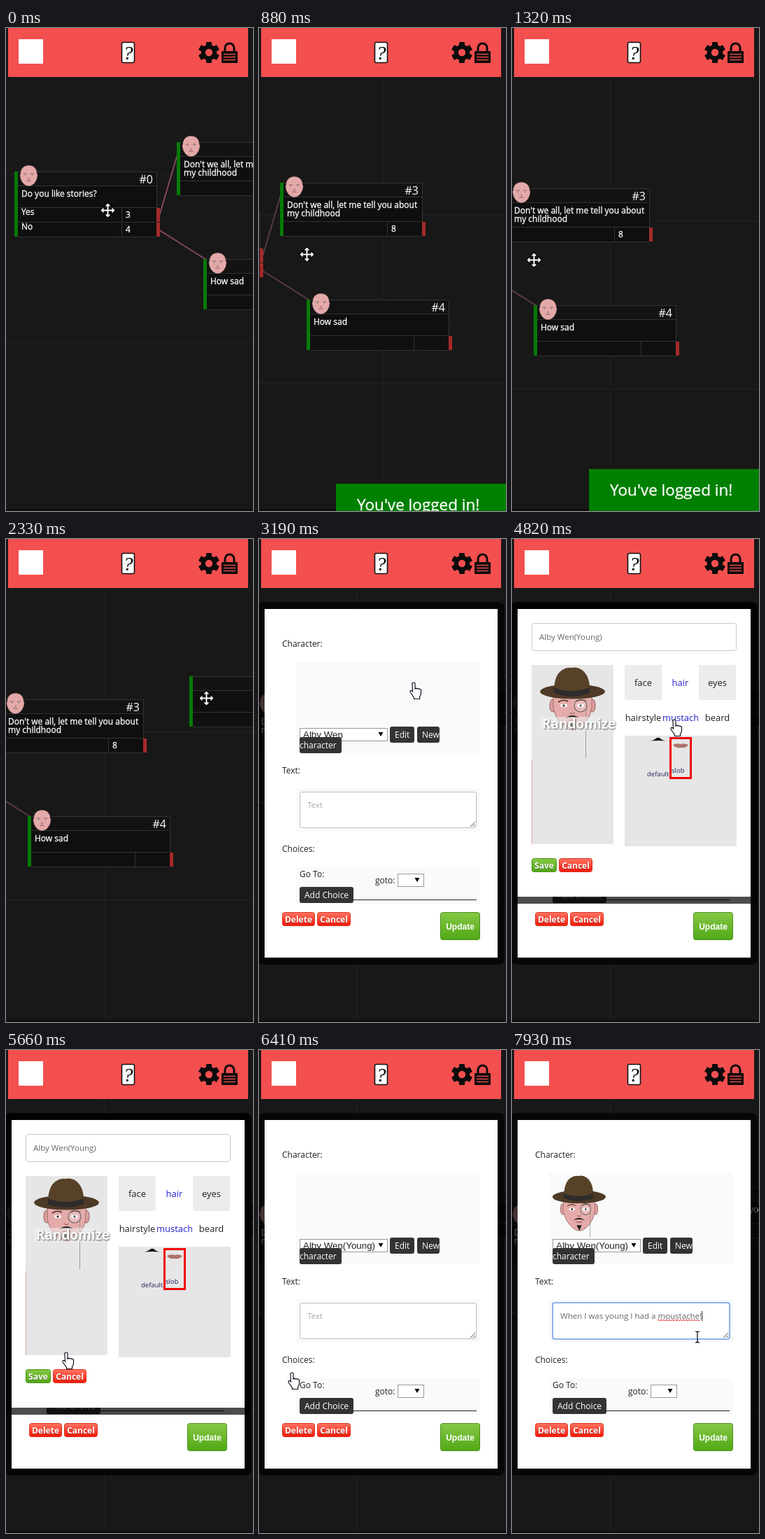
These frames come from a looping animation (353 px wide and 690 px high, 8000 ms). An HTML page:

```html
<!DOCTYPE html>
<html lang="en">
<head>
<meta charset="utf-8">
<title>Story node editor</title>
<style>
html, body { margin: 0; width: 100%; height: 100%; overflow: hidden; background: #181818; }
svg { display: block; width: 353px; height: 690px; }
text { font-family: "Open Sans", "Noto Sans", sans-serif; font-size: 12px; white-space: pre; }
.arial { font-family: "Liberation Sans", Arial, sans-serif; }
.node text { fill: #fff; stroke: #fff; stroke-width: .3px; }
.dialog text { fill: #222; }
.dialog .light { fill: #fff; }
.dialog .blue { fill: #2222cc; }
.dialog .field { fill: #666; font-size: 11.5px; }
.bold { font-weight: 700; }
.mid { text-anchor: middle; }
.end { text-anchor: end; }
</style>
</head>
<body>
<svg id="stage" viewBox="0 0 353 690" xmlns="http://www.w3.org/2000/svg"></svg>
<script>
const LOOP = 8000;
const NAME = 'Alby Wen';
const STORY = 'When I was young I had a moustache!';

// Bursts of picture changes: first time, last time, number of steps.
const BURSTS = [
  [120, 880, 8], [1000, 1780, 8], [2010, 2330, 4], [2530, 2990, 5], [3190, 3950, 8],
  [4170, 4470, 4], [4700, 5040, 4], [5240, 5760, 6], [6410, 6920, 6], [7140, 7380, 3], [7610, 7930, 4]
];
const STEPS = [0, ...BURSTS.flatMap(([a, b, n]) =>
  Array.from({ length: n }, (_, i) => Math.floor(a + (b - a) * i / (n - 1))))];

// Motion tables: time, then values.
const PAN = [[0, 0, 0], [337, 0, 0], [880, -214, 58], [1222, -251, 66]];
const POINTER = [
  [0, 146, 261], [337, 283, 266], [880, 69, 324], [1222, 32, 332], [1780, 266, 196], [2010, 266, 196],
  [2330, 287, 228], [2760, 287, 228], [3190, 221, 205], [3516, 204, 280], [3733, 204, 280],
  [3950, 150, 142], [4170, 150, 142], [4270, 240, 206], [4470, 240, 254], [4700, 238, 256],
  [4813, 232, 258], [5040, 241, 314], [5240, 241, 314], [5760, 47, 461], [6410, 47, 461],
  [6818, 250, 385], [6920, 265, 395], [7380, 265, 395], [7610, 265, 410]
];
const TOAST = [[771, 690], [880, 651], [1000, 630], [1445, 630], [1668, 690]];
const MAIN = [[2760, -518, 0], [2875, -300, .5], [2990, -90, 1], [3190, 0, 1]];
const EDITOR = [[3733, -411, 0], [3841, -190, .5], [3950, 0, 1]];
const TYPED = [[6920, 0], [7140, 3], [7380, 12], [7610, 17], [7930, 35]];

function at(table, t) {
  const i = table.findIndex(k => k[0] > t);
  if (i === 0) return table[0].slice(1);
  if (i < 0) return table[table.length - 1].slice(1);
  const a = table[i - 1], b = table[i], p = (t - a[0]) / (b[0] - a[0]);
  return a.slice(1).map((v, j) => v + (b[j + 1] - v) * p);
}

// Markup helpers
const rect = (x, y, w, h, fill, more = '') =>
  `<rect x="${x}" y="${y}" width="${w}" height="${h}" fill="${fill}" ${more}/>`;
const box = (x, y, w, h, fill, line, r = 0) =>
  rect(x + .5, y + .5, w - 1, h - 1, fill, `stroke="${line}" rx="${r}"`);
const text = (x, y, s, cls = '', more = '') => `<text x="${x}" y="${y}" class="${cls}" ${more}>${s}</text>`;
const path = (d, fill, more = '') => `<path d="${d}" fill="${fill}" ${more}/>`;
const oval = (x, y, rx, ry, fill, more = '') =>
  `<ellipse cx="${x}" cy="${y}" rx="${rx}" ry="${ry}" fill="${fill}" ${more}/>`;
const group = (id, inner, more = '') => `<g id="${id}" ${more}>${inner}</g>`;

const baldFace = (x, y, s) => `<g transform="translate(${x} ${y}) scale(${s})">` +
  path('M0-14.5C8-14.5 11.5-9 11.5-3L12.5-1 11.5 4C10 9 6 14.5 0 14.5S-10 9-11.5 4L-12.5-1-11.5-3C-11.5-9-8-14.5 0-14.5Z', '#e3a9a8', 'stroke="#c08a88" stroke-width=".5"') +
  path('M-7.5-2.5q2.500-1.200 5 0M7.5-2.5q-2.500-1.200-5 0M-3 7.500q3-1.500 6 0M-1.5 4h3', 'none', 'stroke="#7d4c48" stroke-width=".9"') +
  oval(-5, -.5, 1.8, .9, '#f6e8e4') + oval(5, -.5, 1.8, .9, '#f6e8e4') +
  oval(-5, -.5, .8, .8, '#333') + oval(5, -.5, .8, .8, '#333') + '</g>';

const hatFace =
  oval(58, 238, 4, 9, '#dd9f9e', 'stroke="#8d5a58"') + oval(115, 238, 4, 9, '#dd9f9e', 'stroke="#8d5a58"') +
  path('M59 218h55v22q-2 18-16 29-11 8-22 0-15-12-17-29Z', '#e5abaa', 'stroke="#a06c6a"') +
  path('M66 233q7-5 14-1M92 232q7-4 14 0', 'none', 'stroke="#4a3020" stroke-width="1.6"') +
  oval(74, 238, 5, 2.4, '#fff') + oval(98, 238, 5, 2.4, '#fff') +
  oval(74, 238, 1.6, 1.8, '#333') + oval(98, 238, 1.6, 1.8, '#333') +
  path('M83 248q3 3 7 0', 'none', 'stroke="#a06c6a" stroke-width="1.4"') +
  path('M76 256q10-8 21 0-10-3-21 0Z', '#222') +
  path('M81 259h11', 'none', 'stroke="#9b4c4c" stroke-width="1.5"') +
  path('M82 264h9l-4 9Z', '#222') +
  oval(98, 238, 9, 9, 'rgba(255,255,255,.2)', 'stroke="#666" stroke-width="1.2"') +
  path('M105.5 244v69', 'none', 'stroke="#8a8a8a" stroke-width=".8"') +
  oval(86.5, 218, 46.5, 10.5, '#4d3a26') +
  path('M60 218q0-24 12-31 6-4 13-3 8-2 15 3 12 9 11 31-25 10-51 0Z', '#574229') +
  path('M60 212q25 10 51 0v8q-26 10-51 0Z', '#2e2c2b');

// Story canvas
function node(id, x, y, lines, rows, face) {
  const body = lines > 1 ? 35 : 31, top = y + 20 + body, h = 20 + body + 21 * rows.length;
  let s = rect(x + 5, y, 199, h, '#0f0f0f') + rect(x + 5, y, 199, 20, '#131313') +
    rect(x, y, 5, h, '#067a06') +
    path(`M${x + 5} ${y + .5}h198.5v${h}h-198.5M${x + 5} ${y + 20.5}h198`, 'none', 'stroke="#333"') +
    text(x + 198, y + 17, '#' + id, 'end', 'style="font-size:16px;stroke:none"');
  rows.forEach(([label, to], i) => {
    const r = top + 21 * i;
    s += path(`M${x + 5} ${r + .5}h198M${x + 153.5} ${r}v21`, 'none', 'stroke="#333"') +
      rect(x + 203, r + 1, 5, 20, '#a52a2a') + text(x + 10, r + 11, label) + text(x + 159, r + 15, to);
  });
  return s + (face ? baldFace(x + 20.5, y + 6, 1) : '');
}

const world =
  path('M219.500 267L249 167M219.500 289L287 331.500', 'none', 'id="links" stroke-width="1.8"') +
  node(0, 12, 205, 1, [['Yes', 3], ['No', 4]], true) + text(22, 241, 'Do you like stories?') +
  node(3, 244, 163, 2, [['', 8]], true) + text(254, 199, "Don't we all, let me tell you about") + text(254, 211, 'my childhood') +
  node(4, 282, 330, 1, [['', '']], true) + text(292, 366, 'How sad') +
  group('fresh', node(8, 513, 130, 1, [['', '']], false) + text(523, 166, '', '', 'id="preview"'));

// Page header
const teeth = Array.from({ length: 6 }, (_, i) =>
  rect(286, 20, 8, 8, '#0b0b0b', `rx="1" transform="rotate(${i * 60} 290 35)"`)).join('');
const header = rect(3, 0, 343, 70, '#f44f4f') +
  rect(18, 16, 35, 35, '#fff') +
  rect(165.5, 20.5, 18, 29, '#fff', 'stroke="#111" stroke-width="1.6" rx="2"') +
  text(174.5, 45, '?', 'mid', 'style="font:italic 28px \'Liberation Serif\',serif"') +
  teeth + '<circle cx="290" cy="35" r="8.2" fill="none" stroke="#0b0b0b" stroke-width="6"/>' +
  path('M313 34v-5.500a6.500 6.500 0 0 1 13 0v5', 'none', 'stroke="#0b0b0b" stroke-width="3"') +
  rect(308, 33, 23, 17, '#0b0b0b', 'rx="1"') +
  path('M311 37.5h17M311 41.5h17M311 45.5h17', 'none', 'stroke="#e04a48" stroke-width="1.4"');

// Dialogs
const button = (x, y, w, label, hue) =>
  box(x, y, w, 20, `url(#${hue})`, hue === 'red' ? '#d8321f' : '#4b9317', 3) +
  text(x + w / 2, y + 14.5, label, 'light bold mid', 'style="text-shadow:0 1px 1px rgba(0,0,0,.4)"');
const arrow = (x, y) => path(`M${x - 3.5} ${y - 3}h7l-3.5 6Z`, '#000');
const darkButton = (x, y, w, label, tx) => rect(x, y, w, 23, '#333', 'rx="3"') + text(tx, y + 16, label, 'light');
const sheet = bottom => rect(-2, 90, 353, bottom - 80, 'rgba(0,0,0,.7)', 'rx="8"') + rect(8, 100, 333, bottom - 100, '#fff');
const panel = (y, h) => rect(53, y, 263, h, '#f9fafa');

const main = sheet(598) +
  text(33, 154, 'Character:') + panel(175, 131) +
  group('mainBald', baldFace(90, 220, 2.6)) +
  group('mainHat', hatFace, 'transform="translate(25 18) scale(.82 .88)" clip-path="url(#chain)"') +
  box(58, 270, 126, 19, '#fff', '#999') +
  text(63, 284, NAME, 'arial', 'id="picked" style="font-size:13.33px"') + arrow(174, 279) +
  darkButton(187, 268, 35, 'Edit', 194) + darkButton(226, 268, 32, 'New', 233) + darkButton(58, 283, 60, 'character', 58) +
  text(33, 335, 'Text:') + panel(356, 62) +
  box(58, 361, 253, 52, '#fff', '#bbb', 3) +
  rect(58, 361, 253, 52, 'none', 'id="focus" rx="3" stroke="#8fb2ee" stroke-width="2"') +
  path('M302 411l7-7M306 411l3-3', 'none', 'stroke="#555"') +
  text(69, 384, 'Text', 'field', 'id="hint" style="fill:#aaa"') +
  text(69, 384, '', 'field', 'id="typed"') + rect(0, 373, 1, 14, '#222', 'id="caret"') +
  path('M208 386' + 'q1 -2 2 0t2 0'.repeat(15), 'none', 'id="squiggle" stroke="#e33" stroke-width="1"') +
  text(33, 447, 'Choices:') + panel(469, 52) +
  text(58, 483, 'Go To:') + text(166, 492, 'goto:') + box(198, 478, 38, 19, '#fff', '#999') + arrow(226, 487) +
  rect(58, 515, 253, 1, '#222') + darkButton(58, 497, 77, 'Add Choice', 65) +
  button(33, 533, 47, 'Delete', 'red') + button(83, 533, 48, 'Cancel', 'red') +
  box(259, 533, 57, 40, 'url(#green)', '#4b8f1c', 3) + text(287.5, 558, 'Update', 'arial light bold mid');

const tab = (i, label) => rect(161 + 53 * i, 180, 53, 50, '#ececec') + text(187.5 + 53 * i, 210, label, 'mid', 'style="font-size:13px"');
const small = 'style="font-size:9.5px;fill:#22225a"';
const big = 'style="font-size:13px"';
const editor = sheet(511) +
  box(28, 120, 293, 40, '#fff', '#c8c8c8', 3) + text(39, 144, NAME, 'field', 'id="nameField"') +
  rect(28, 180, 117, 256, '#e6e6e6') + rect(28, 316, 1, 120, '#d9a6a0') +
  group('editBald', baldFace(86, 230, 2.8)) + group('editHat', hatFace) +
  rect(40, 254, 93, 21, 'rgba(240,240,240,.55)') +
  text(43, 271, 'Randomize', 'light bold', 'style="font-size:19px;text-shadow:1px 1px 2px rgba(0,0,0,.6)"') +
  tab(0, 'face') + tab(1, 'hair') + tab(2, 'eyes') + rect(161, 281, 160, 158, '#e6e6e6') +
  group('hairTab', rect(214, 180, 53, 50, '#fff') + text(240.5, 210, 'hair', 'mid blue', big) +
    text(187.5, 260, 'hairstyle', 'mid', big) +
    text(215, 260, 'mustache', '', 'id="kind" clip-path="url(#cell)" ' + big) + text(293.5, 260, 'beard', 'mid', big)) +
  group('choices', rect(226.5, 284.5, 29, 57, 'none', 'stroke="#f00000" stroke-width="3"')) +
  group('shapes', path('M193 289q8 0 15-5.500 1 1 2 0 6 5.500 15 5.500-9-1-16-1-8 0-16 1Z', '#111') +
    path('M230 294q6-3 11-1 5-2 11 1-3 5-11 4-8 1-11-4Z', '#ad736b') +
    text(193, 339, 'default', '', small) + text(228, 334, 'slob', '', small)) +
  button(28, 456, 36, 'Save', 'green') + button(67, 456, 48, 'Cancel', 'red');

const fade = (id, a, b) => `<linearGradient id="${id}" x2="0" y2="1"><stop stop-color="${a}"/><stop offset="1" stop-color="${b}"/></linearGradient>`;
const outline = 'stroke="#000" stroke-width="2" paint-order="stroke" transform="translate(-.5 -.5)"';
const pointer =
  group('move', path('M0-10l4 4h-3v5h5v-3l4 4-4 4v-3h-5v5h3l-4 4-4-4h3v-5h-5v3l-4-4 4-4v3h5v-5h-3z', '#fff', outline)) +
  group('hand', path('M-2 2q0-2 2-2t2 2v7q1.500-1.500 3 0 1.500-1 3 .5 2-.5 2.500 1v5q0 3-2 5v3h-8v-2l-5-7q-1-2 0-3 1.500-.5 3 1.500z', '#fff', 'stroke="#112" stroke-width="1.2"')) +
  group('beam', path('M-3-8q3 0 3 2v12q0 2 3 2M3-8q-3 0-3 2m0 12q0 2-3 2', 'none', 'stroke="#000" stroke-width="1.2"'));

document.getElementById('stage').innerHTML =
  `<defs>${fade('red', '#ff7563', '#f91707')}${fade('green', '#86c846', '#51a815')}` +
  '<clipPath id="cell"><rect x="214" y="240" width="52" height="30"/></clipPath>' +
  '<clipPath id="chain"><rect x="30" y="180" width="120" height="103"/></clipPath></defs>' +
  rect(0, 0, 353, 690, '#181818') + path('', 'none', 'id="grid" stroke="#222"') +
  group('world', world, 'class="node"') + rect(0, 687, 353, 3, '#130c10') +
  group('main', main, 'class="dialog"') + group('editor', editor, 'class="dialog"') + header +
  group('toast', rect(110, 0, 243, 70, '#008000') +
    text(140, 38, "You've logged in!", '', 'fill="#fff" stroke="#fff" stroke-width=".3" style="font-size:22.5px"')) +
  group('pointer', pointer);

const el = id => document.getElementById(id);
const set = (id, key, value) => el(id).setAttribute(key, value);
const show = (id, on) => { el(id).style.display = on ? '' : 'none'; };
const write = (id, s) => { el(id).textContent = s; };
const wrap = v => ((v % 240) + 240) % 240;

function slide(id, table, t) {
  const [y, alpha] = at(table, t);
  set(id, 'transform', `translate(0 ${y})`);
  set(id, 'opacity', alpha);
}

function draw(t) {
  const [px, py] = at(PAN, t).map(Math.round);
  const gx = wrap(151 + px) + .5, gy = wrap(209 + py) + .5;
  set('grid', 'd', [0, 240, 480].map(k => `M${gx + k} 0V690M0 ${gy + k}H353`).join(''));
  set('world', 'transform', `translate(${px} ${py})`);
  set('links', 'stroke', t < 500 ? '#8b4a60' : '#5d3b46');
  show('fresh', t >= 2010);

  set('toast', 'transform', `translate(0 ${at(TOAST, t)[0]})`);
  slide('main', MAIN, t);
  slide('editor', EDITOR, t);
  show('editor', t >= 3733 && t < 6410);

  const renamed = NAME + (t >= 4170 ? '(Young)' : '');
  write('nameField', renamed);
  write('picked', t >= 6410 ? renamed : NAME);
  show('editBald', t < 4270);
  show('editHat', t >= 4270);
  show('hairTab', t >= 4270);
  show('choices', t >= 4470);
  show('shapes', t >= 4700);
  set('kind', 'class', t >= 4700 ? 'blue' : '');
  show('mainBald', t >= 3298 && t < 6410);
  show('mainHat', t >= 6512);

  const n = Math.round(at(TYPED, t)[0]), words = STORY.slice(0, n), focused = t >= 6818;
  write('typed', words);
  write('preview', words);
  show('hint', !n);
  show('focus', focused);
  show('caret', focused);
  set('caret', 'x', 69 + (n ? el('typed').getComputedTextLength() : 0));
  show('squiggle', n >= 34);

  const [cx, cy] = at(POINTER, t).map(Math.round);
  set('pointer', 'transform', `translate(${cx} ${cy})`);
  show('move', t < 2875);
  show('hand', t >= 2875 && !focused);
  show('beam', focused);
}

let last = -1;
function tick() {
  const now = performance.now() % LOOP;
  const step = STEPS.filter(s => s <= now).pop();
  if (step !== last) draw(last = step);
  requestAnimationFrame(tick);
}
tick();
</script>
</body>
</html>
```
